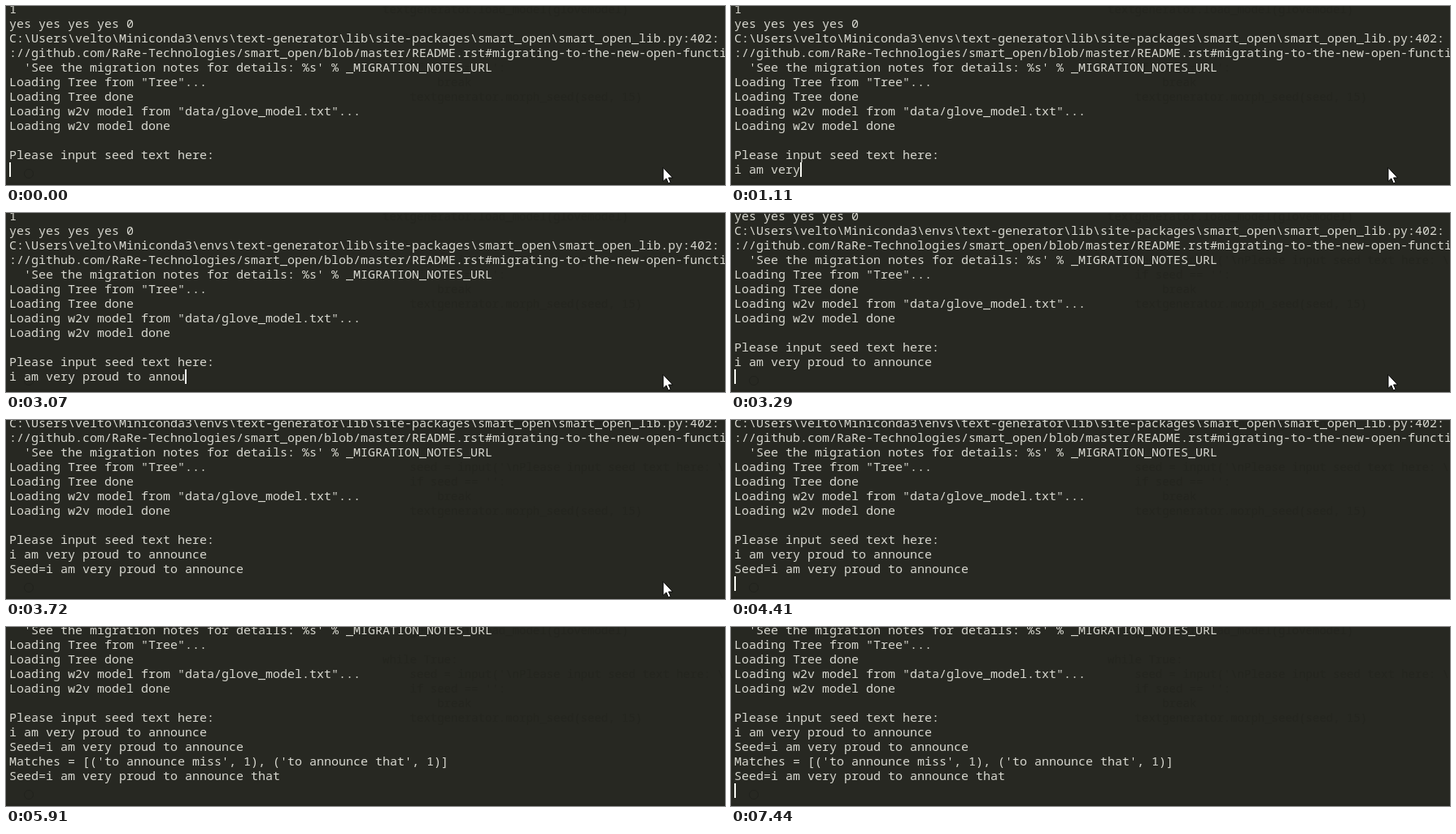
Write an HTML page that moves like this. It is 884x221 px and loops after 8 s.

```html
<!DOCTYPE html>
<html lang="en">
<head>
<meta charset="utf-8">
<title>Text generator terminal</title>
<style>
  html, body { margin: 0; width: 100%; height: 100%; overflow: hidden; background: #272822; }
  #stage { position: relative; width: 884px; height: 221px; overflow: hidden; background: #272822; }
  pre { position: absolute; margin: 0; font-family: "Noto Sans Mono", "DejaVu Sans Mono", monospace; line-height: 18px; font-variant-ligatures: none; }
  #log { left: 4px; top: -6px; font-size: 15px; color: #d8d8d0; }
  #ghost { left: 463px; top: -5px; font-size: 14px; color: #24251f; }
  #caret { position: absolute; top: 193px; width: 2px; height: 18px; background: #f8f8f2; }
  #ring { position: absolute; left: 22px; top: 201px; width: 10px; height: 10px; border: 1px solid #21221d; border-radius: 50%; }
  #edge { position: absolute; left: 0; top: 218px; width: 884px; height: 3px; background: #252620; }
  #mouse { position: absolute; left: 807px; top: 199px; }
</style>
</head>
<body>
<div id="stage">
  <div id="ring"></div>
  <div id="edge"></div>
  <pre id="ghost">textgenerator.load_model(glovemodel)

while True:
    seed = input('\nPlease input seed text here: \n')
    if seed == '':
        break
    textgenerator.morph_seed(seed, 15)</pre>
  <pre id="log"></pre>
  <div id="caret"></div>
  <svg id="mouse" width="14" height="22">
    <path d="M1 .5V17.5l3.8-3.6 2.6 6 2.8-1.2-2.6-5.7h5z" fill="#fff" stroke="#000"/>
  </svg>
</div>
<script>
const LOOP = 8000, STEP = 218.5, BLINK = 1060;
const ROWS = 12, CELL = 9, KEYS_PER_STEP = 1.75;
// Moments counted in screen refreshes.
const ENTER = 15, ECHO = 17, MATCHES = 27;

const seed = "i am very proud to announce";
const lines = [
  "1",
  "yes yes yes yes 0",
  String.raw`C:\Users\velto\Miniconda3\envs\text-generator\lib\site-packages\smart_open\smart_open_lib.py:402:`,
  "://github.com/RaRe-Technologies/smart_open/blob/master/README.rst#migrating-to-the-new-open-functions",
  "  'See the migration notes for details: %s' % _MIGRATION_NOTES_URL",
  'Loading Tree from "Tree"...',
  "Loading Tree done",
  'Loading w2v model from "data/glove_model.txt"...',
  "Loading w2v model done",
  "",
  "Please input seed text here:",
  seed,
  "Seed=" + seed,
  "Matches = [('to announce miss', 1), ('to announce that', 1)]",
  "Seed=" + seed + " that",
];

const byId = id => document.getElementById(id);
const log = byId("log"), caret = byId("caret"), mouse = byId("mouse");

function render(time) {
  const step = Math.floor((time + 4) / STEP);
  const typed = step < ENTER ? Math.floor(step * KEYS_PER_STEP + 0.3) : 0;
  const top = (step >= ENTER) + (step >= ECHO) + 2 * (step >= MATCHES);
  const caretOn = step < ECHO || step * STEP % BLINK < BLINK / 2;

  log.textContent = [...lines.slice(top, top + ROWS - 1), seed.slice(0, typed)].join("\n");
  caret.style.left = 4 + typed * CELL + "px";
  caret.style.visibility = caretOn ? "visible" : "hidden";
  mouse.style.transform = `translateY(${Math.max(0, step - ECHO) * 11}px)`;
}

const begin = performance.now();
function tick() {
  render((performance.now() - begin) % LOOP);
  requestAnimationFrame(tick);
}
tick();
</script>
</body>
</html>
```
